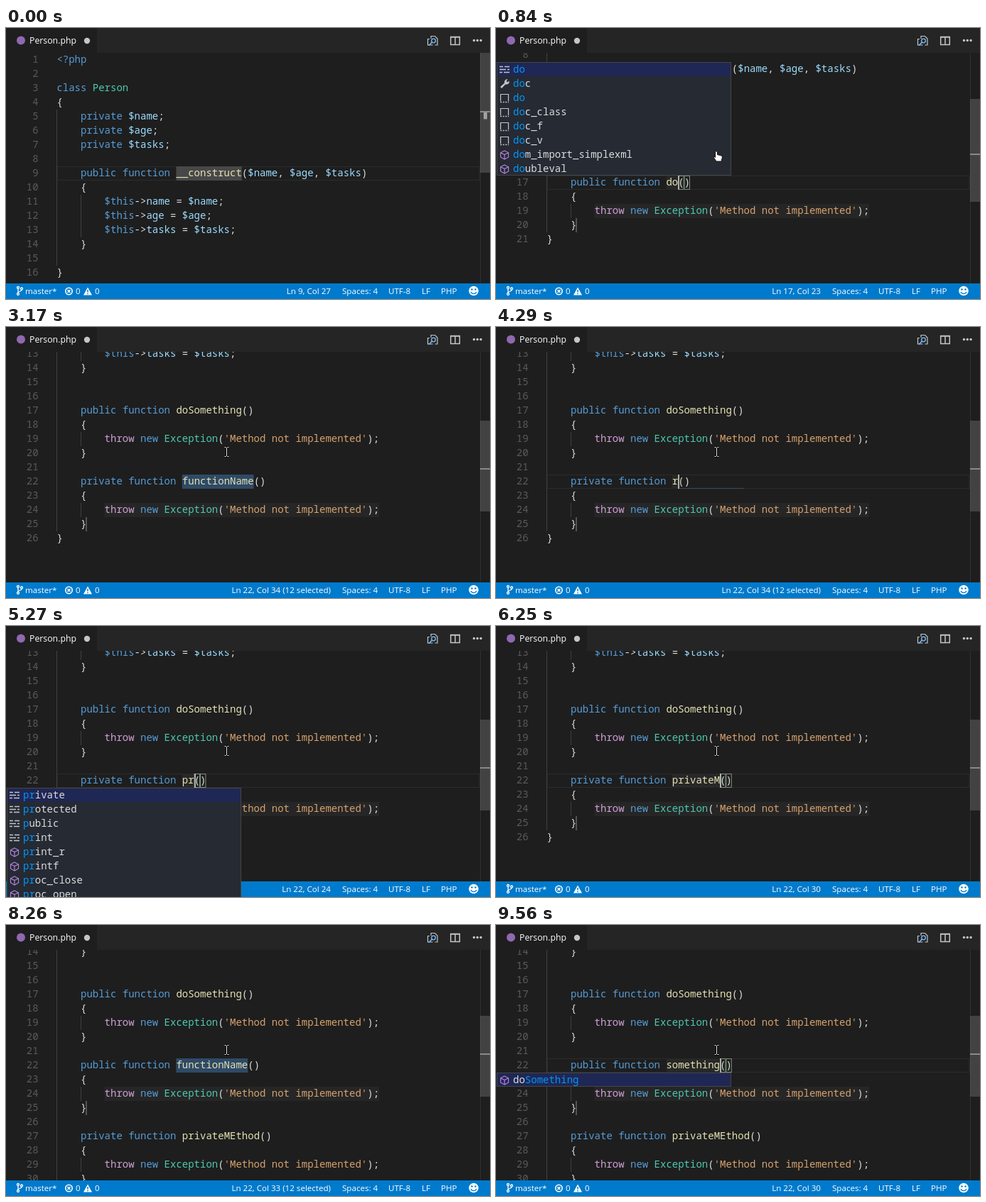
An HTML page for the animation above (9650 ms loop, 681x382 px).

```html
<!DOCTYPE html>
<html lang="en">
<head>
<meta charset="utf-8">
<title>Editor snippets</title>
<style>
  html, body { margin: 0; width: 100%; height: 100%; overflow: hidden; background: #1e1e1e; }
  svg { display: block; width: 100%; height: 100%; }
  text { white-space: pre; }
  .code text { font: 500 14px "Noto Sans Mono", monospace; fill: #dcdcdc; }
  .ui text { font: 500 11.6px "Open Sans", sans-serif; fill: #fff; }
  .ui .tab { font-size: 12.3px; }
  .code .num { fill: #5a5a5a; text-anchor: end; font-weight: 400; }
  .kw { fill: #569cd6; } .type { fill: #4ec9b0; } .var { fill: #9cdcfe; }
  .fn { fill: #e4e2b4; } .str { fill: #d7a26e; } .ctl { fill: #d0a0d6; }
  .hit { fill: #0097fb; }
  .stroke { fill: none; stroke: #c5c5c5; }
</style>
</head>
<body>
<svg viewBox="0 0 681 382">
  <defs>
    <clipPath id="pane"><rect y="35" width="681" height="325"/></clipPath>
    <g id="keyword" class="stroke"><path d="M0 2.5h5M7 2.5h7M0 6.5h9M0 10.5h4M6 10.5h8M11 6.5h3" stroke-width="1.6"/></g>
    <g id="wrench"><path d="M1 11 7 5.5A3.8 3.8 0 0 1 11.5 .5L9.5 2.8 11 4.5 13.5 2.6A3.8 3.8 0 0 1 8.5 7.3L3 13Z" fill="#c5c5c5"/></g>
    <g id="snippet" class="stroke"><path d="M1.5 11V1.5h11V11" stroke-width="1.2"/><path d="M1 12.5h12" stroke-dasharray="2 1.6" stroke-width="1.4"/></g>
    <g id="cube" fill="none" stroke="#b180d7" stroke-width="1.2"><path d="M7 1 12.5 3.8V10L7 13 1.5 10V3.8ZM1.5 3.8 7 6.6 12.5 3.8M7 6.6V13"/></g>
  </defs>
  <rect width="681" height="382" fill="#1e1e1e"/>
  <g class="code" clip-path="url(#pane)" id="editor"></g>
  <g class="ui">
    <rect width="681" height="35" fill="#252526"/>
    <rect width="128" height="35" fill="#1e1e1e"/>
    <circle cx="21" cy="17.5" r="6" fill="#9068b0"/>
    <text class="tab" x="33" y="22">Person.php</text>
    <circle cx="114" cy="18" r="4.2" fill="#c5c5c5"/>
    <g class="stroke">
      <path d="M596 15.500h-2.500v8.500h7M598 15v-3.500h5.500l3.500 3.500v9h-3.500" stroke-width="1.2"/>
      <circle cx="601.5" cy="18" r="2.8" stroke="#75beff" stroke-width="1.3"/>
      <path d="m599.500 20-4.500 4.500" stroke="#75beff" stroke-width="1.6"/>
      <path d="M625.7 12.5h12.6v11h-12.600zM632 12v12M625 13h14" stroke-width="1.5"/>
    </g>
    <g fill="#c5c5c5"><circle cx="658.5" cy="17.5" r="1.7"/><circle cx="663.3" cy="17.5" r="1.7"/><circle cx="668.1" cy="17.5" r="1.7"/></g>
    <rect y="360" width="681" height="22" fill="#007acc"/>
    <g fill="none" stroke="#fff" stroke-width="1.3">
      <circle cx="17" cy="366" r="1.5"/><circle cx="17" cy="375" r="1.5"/><circle cx="22" cy="367.5" r="1.5"/>
      <path d="M17 367.5v6M22 369c0 3-5 1.5-5 4.5"/>
      <circle cx="88.5" cy="371" r="4.7" stroke-width="1.6"/><path d="m86.5 369 4 4m0-4-4 4" stroke-width="1.6"/>
    </g>
    <path d="m115 365.5 6 11h-12z" fill="#fff"/>
    <path d="M115 369v3.5M115 373.7v1.5" stroke="#007acc" stroke-width="1.5"/>
    <text x="27" y="375">master*</text><text x="98" y="375">0</text><text x="125" y="375">0</text>
    <text id="position" x="457" y="375" text-anchor="end"></text>
    <text x="473" y="375">Spaces: 4</text><text x="538" y="375">UTF-8</text>
    <text x="585" y="375">LF</text><text x="612" y="375">PHP</text>
    <circle cx="658" cy="370.5" r="6.8" fill="#fff"/>
    <g fill="#007acc"><circle cx="655.5" cy="368.5" r="1.2"/><circle cx="660.5" cy="368.5" r="1.2"/></g>
    <path d="M654 372c1.5 3.5 6.5 3.5 8 0" fill="none" stroke="#007acc" stroke-width="1.3"/>
  </g>
  <g class="code" id="overlay"></g>
</svg>
<script>
const LOOP = 9650, LEFT = 71.4, CHAR = 8.4, LINE = 20, TOP = 35, VIEW = 325;
const FIELD = 'functionName';

const head = `<?php

class Person
{
    private $name;
    private $age;
    private $tasks;

    public function __construct($name, $age, $tasks)
    {
        $this->name = $name;
        $this->age = $age;
        $this->tasks = $tasks;
    }`.split('\n');
const method = (access, name) => [
  `    ${access} function ${name}()`, '    {',
  "        throw new Exception('Method not implemented');", '    }'];

const scenes = {
  start: { scroll: 0, row: 9, lines: () => [...head, '', '}'] },
  first: { scroll: 147, row: 17, access: 'public',
    lines: name => [...head, '', '', ...method('public', name), '}'] },
  second: { scroll: 247, row: 22, access: 'private',
    lines: name => [...head, '', '', ...method('public', 'doSomething'), '', ...method('private', name), '}'] },
  third: { scroll: 267, row: 22, access: 'public',
    lines: name => [...head, '', '', ...method('public', 'doSomething'), '',
      ...method('public', name), '', ...method('private', 'privateMEthod'), '}'] },
};

// Each suggestion is "icon label".
const list = text => text.split(',').map(item => item.split(' '));
const popups = {
  do: list('keyword do,wrench doc,snippet do,snippet doc_class,snippet doc_f,snippet doc_v,cube dom_import_simplexml,cube doubleval'),
  p: list('keyword private,keyword protected,keyword public,keyword print,cube print_r,cube printf,cube proc_close,cube proc_open'),
  s: list('keyword static,keyword switch,cube sort,cube scandir,cube serialize,cube session_id,cube sha1,cube similar_text'),
  private: list('keyword private'),
  some: list('cube doSomething'),
};
popups.doS = popups.do.slice(1);

// [time, scene, name, popup, flag]
const timeline = [
  [0, 'start', '', '', 'off'],
  [170, 'first', FIELD, '', 'off'], [440, 'first', FIELD],
  [720, 'first', 'd'], [800, 'first', 'do'], [840, 'first', 'do', 'do'],
  [1210, 'first', 'doS', 'do'], [1290, 'first', 'doS', 'doS'], [1380, 'first', 'doSo', 'doS'],
  [1540, 'first', 'doSom', 'doS'], [1680, 'first', 'doSome', 'doS'], [2040, 'first', 'doSomet'],
  [2330, 'first', 'doSometh'], [2450, 'first', 'doSomethi'], [2590, 'first', 'doSomethin'], [2720, 'first', 'doSomething'],
  [3170, 'second', FIELD, '', 'off'], [3420, 'second', FIELD], [3860, 'second', FIELD, '', 'off'],
  [4290, 'second', 'r', '', 'stale'], [4330, 'second', 'r'], [4770, 'second', ''],
  [5000, 'second', 'p'], [5040, 'second', 'p', 'p'], [5160, 'second', 'pr', 'p'],
  [5300, 'second', 'pri', 'p'], [5430, 'second', 'priv', 'private'], [5600, 'second', 'priva', 'private'],
  [5800, 'second', 'privat', 'private'], [5890, 'second', 'private', 'private'],
  [6210, 'second', 'privateM', 'private'], [6250, 'second', 'privateM'], [6340, 'second', 'privateME'],
  [6430, 'second', 'privateMEt'], [6520, 'second', 'privateMEth'], [6640, 'second', 'privateMEtho'],
  [6760, 'second', 'privateMEthod'], [7210, 'second', 'privateMEthod', '', 'off'],
  [7700, 'third', FIELD, '', 'off'], [7830, 'third', FIELD], [8260, 'third', FIELD, '', 'off'],
  [8510, 'third', 's'], [8600, 'third', 's', 's'], [8720, 'third', 'so', 's'], [8840, 'third', 'som', 'some'],
  [8980, 'third', 'some', 'some'], [9110, 'third', 'somet', 'some'], [9250, 'third', 'someth', 'some'],
  [9330, 'third', 'somethi', 'some'], [9420, 'third', 'somethin', 'some'], [9520, 'third', 'something', 'some'],
];

const escape = s => s.replace(/&/g, '&amp;').replace(/</g, '&lt;').replace(/>/g, '&gt;');
const span = (cls, s) => cls ? `<tspan class="${cls}">${escape(s)}</tspan>` : escape(s);
const rect = (x, y, w, h, fill, extra = '') => `<rect x="${x}" y="${y}" width="${w}" height="${h}" fill="${fill}" ${extra}/>`;
const column = n => LEFT + n * CHAR;

const grammar = /(?<str>'.*?')|(?<kw><\?php|\$this|\b(?:class|private|public|function|new)\b(?!\())|(?<ctl>\bthrow\b)|(?<type>Person|Exception)|(?<var>\$\w+|(?<=->)\w+)|(?<fn>\w+(?=\())|(?<other>.)/g;
const paint = line => line.replace(grammar, (...args) => {
  const [cls, text] = Object.entries(args.at(-1)).find(([, value]) => value !== undefined);
  return span(cls === 'other' ? '' : cls, text);
});

function drawLine(line, i, y) {
  const depth = line ? line.search(/\S/) / 4 : i > 3 ? 1 : 0;
  let out = `<text class="num" x="45.6" y="${y + 14}">${i + 1}</text>`;
  for (let k = 0; k < depth; k++) out += rect(Math.floor(column(4 * k)), y, 1, LINE, '#404040');
  return out + `<text x="${LEFT}" y="${y + 14}">${paint(line)}</text>`;
}

function drawScrollbar(scene, count) {
  const ratio = VIEW / (count * LINE + VIEW - LINE);
  const mark = Math.floor(TOP + (scene.row - 1) * LINE * ratio);
  return rect(667, TOP, 1, VIEW, '#303030')
    + rect(667, Math.floor(TOP + scene.scroll * ratio), 14, Math.floor(VIEW * ratio), '#797979', 'fill-opacity=".4"')
    + (scene.access ? '' : rect(672, mark, 5, LINE * ratio, '#a0a0a0'))
    + rect(667, mark - 1, 14, 2, '#8a8a8a');
}

function drawLabel(label, typed) {
  let k = 0;
  return [...label].map(ch => {
    const hit = k < typed.length && ch.toLowerCase() === typed[k].toLowerCase();
    if (hit) k++;
    return span(hit ? 'hit' : '', ch);
  }).join('');
}

function drawPopup(rows, typed, y) {
  return rect(1, y, 330, rows.length * LINE, '#252a33')
    + rect(1, y, 330, LINE, '#1f2754')
    + rows.map(([icon, label], i) => `<use href="#${icon}" x="5" y="${y + i * LINE + 4}"/>`
      + `<text x="24" y="${y + i * LINE + 14.5}">${drawLabel(label, typed)}</text>`).join('')
    + rect(1.5, y + .5, 329, rows.length * LINE - 1, 'none', 'stroke="#454545"');
}

const beamPath = 'd="M307.5 169.5h2l1 1 1-1h2M310.5 170v12M307.5 182.5h2l1-1 1 1h2" fill="none"';
const beam = `<path ${beamPath} stroke="#000" stroke-width="2.5"/><path ${beamPath} stroke="#e8e8e8"/>`;
const hand = '<path d="M308.5 174.5q1.5-1.5 3 0v4l6 1.5 1 2-1.5 6h-7l-4-6 1-1 1.5 1.5z" fill="#fff" stroke="#111"/>';

function render([, sceneName, name, popup, flag]) {
  const scene = scenes[sceneName];
  const lines = scene.lines(name);
  const rowTop = n => TOP + (n - 1) * LINE - scene.scroll;
  const y = rowTop(scene.row);
  const typing = Boolean(scene.access);
  const startCol = typing ? scene.access.length + 14 : 20;
  const x = column(startCol), end = x + name.length * CHAR;
  const selected = name === FIELD, stale = flag === 'stale';
  let out = '', top = '';

  if (!selected) out += rect(72, y + .5, 594, LINE - 1, 'none', 'stroke="#2c2c2c"');
  if (stale) out += rect(x, y + LINE - 1, FIELD.length * CHAR, 1, '#3d4a60');

  if (typing) {
    out += rect(x, y, name.length * CHAR, LINE, selected ? '#2f4a66' : '#282828');
    out += rect(column(8), rowTop(scene.row + 2), 46 * CHAR, LINE, '#262626');
    out += rect(112, rowTop(scene.row + 3), 2, LINE, '#525252');
    if (!selected && !stale)
      for (const bx of [end, end + CHAR]) out += rect(bx + .5, y + .5, CHAR - 1, LINE - 1, '#1b241b', 'stroke="#888"');
  } else {
    out += rect(x, y, 11 * CHAR, LINE, '#484848');
  }

  lines.forEach((line, i) => {
    const lineY = rowTop(i + 1);
    if (lineY > TOP - LINE && lineY < TOP + VIEW) out += drawLine(line, i, lineY);
  });
  if (flag !== 'off') out += rect(Math.round(end), y, 2, LINE, '#aeafad');
  out += drawScrollbar(scene, lines.length);

  const above = sceneName === 'first';
  if (popup) {
    const rows = popups[popup];
    top += drawPopup(rows, name, above ? y - rows.length * LINE : y + LINE);
  }
  if (typing) top += popup && above ? hand : beam;

  editor.innerHTML = out;
  overlay.innerHTML = top;
  const col = typing ? startCol + 1 + (stale ? FIELD : name).length : 27;
  position.textContent = `Ln ${scene.row}, Col ${col}` + (selected || stale ? ` (${FIELD.length} selected)` : '');
}

const [editor, overlay, position] = ['editor', 'overlay', 'position'].map(id => document.getElementById(id));
const origin = performance.now();
let shown;
function tick() {
  const t = (performance.now() - origin) % LOOP;
  const state = timeline.findLast(entry => entry[0] <= t);
  if (state !== shown) render(shown = state);
  requestAnimationFrame(tick);
}
tick();
</script>
</body>
</html>
```
